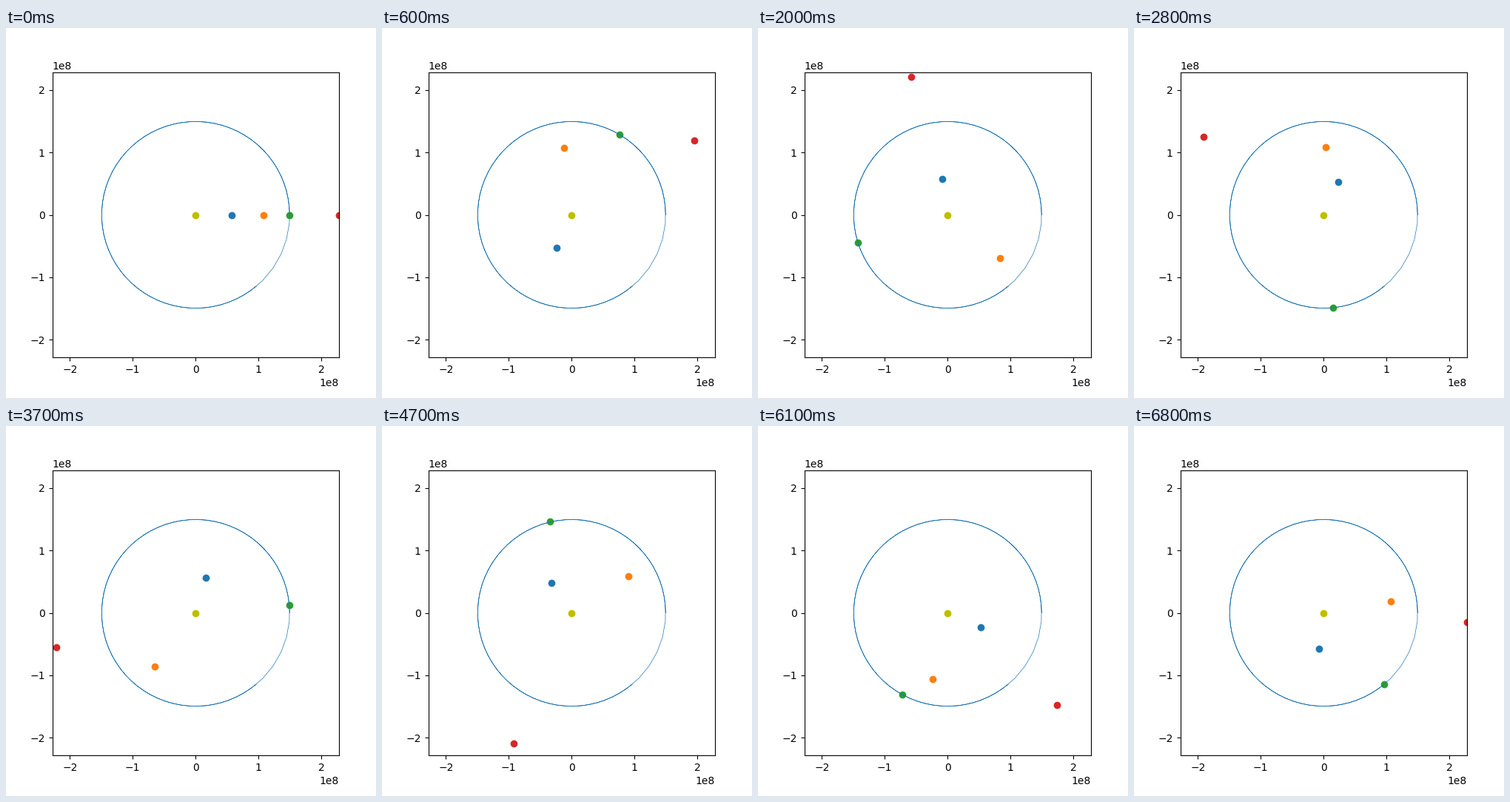
These frames come from a looping animation (500 by 500 pixels, 6900 ms). A matplotlib script:

```python
import numpy as np
import matplotlib.pyplot as plt
from matplotlib.animation import FuncAnimation

FRAMES = 69
DAYS_PER_FRAME = 10
LIMIT = 227.9e6

# (orbit radius in km, period in days, colour)
PLANETS = [
    (57.9e6, 87.97, "C0"),
    (108.2e6, 224.7, "C1"),
    (149.6e6, 365.25, "C2"),
    (227.9e6, 687.0, "C3"),
]


def position(radius, period, day):
    angle = 2 * np.pi * day / period
    return radius * np.cos(angle), radius * np.sin(angle)


fig, ax = plt.subplots(figsize=(5, 5), dpi=100)
ax.set_xlim(-LIMIT, LIMIT)
ax.set_ylim(-LIMIT, LIMIT)

days = np.arange(FRAMES) * DAYS_PER_FRAME
radius, period, _ = PLANETS[2]
ax.plot(*position(radius, period, days), color="C0", lw=0.5)

ax.scatter([0], [0], color="y")
dots = [ax.scatter([r], [0], color=color) for r, _, color in PLANETS]


def update(frame):
    for dot, (r, p, _) in zip(dots, PLANETS):
        dot.set_offsets([position(r, p, frame * DAYS_PER_FRAME)])
    return dots


anim = FuncAnimation(fig, update, frames=FRAMES, interval=100,
                     repeat=True, repeat_delay=0)
plt.show()
```
